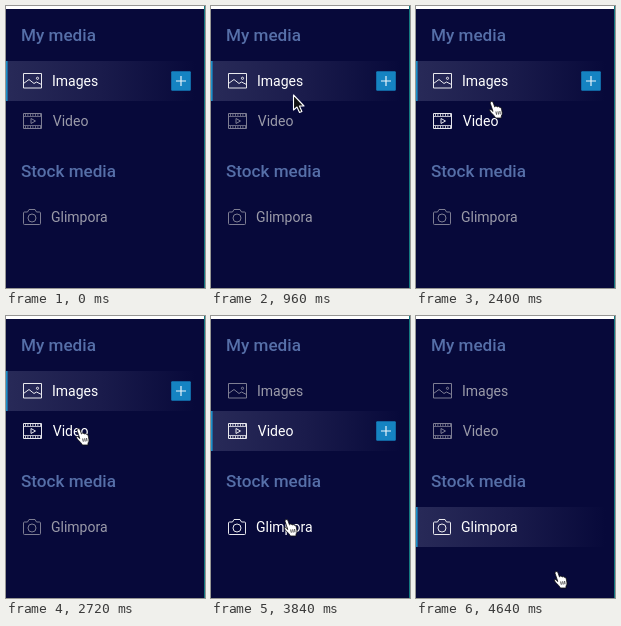
Recreate the animation shown at these times as an HTML page. Size 199 px wide and 282 px high, loop 4.8 s.

```html
<!DOCTYPE html>
<html lang="en">
<head>
<meta charset="utf-8">
<title>Media menu</title>
<style>
  html, body { margin: 0; width: 100%; height: 100%; overflow: hidden; background: #07093a; }
  svg { display: block; width: 199px; height: 282px; }
  text { font-family: Roboto, Arial, sans-serif; font-size: 14px; }
  .head { font-size: 17.1px; font-weight: 500; fill: #566fa8; }
  .item { color: #9b9ba9; }
  .item.lit { color: #fff; }
  .item text { fill: currentColor; }
  .icon { fill: none; stroke: currentColor; stroke-width: 1; stroke-linejoin: round; opacity: .9; }
  .item:not(.lit) .icon { opacity: .8; }
</style>
</head>
<body>
<svg viewBox="0 0 199 282">
  <defs>
    <linearGradient id="glow">
      <stop offset="0" stop-color="#282a58"/>
      <stop offset=".5" stop-color="#1a1b4b"/>
      <stop offset="1" stop-color="#07093a"/>
    </linearGradient>
    <g id="bar">
      <rect width="190" height="40" fill="url(#glow)"/>
      <rect width="1.6" height="40" fill="#1c8fca"/>
    </g>
    <g id="plus">
      <rect x="165.2" y="10.2" width="19.6" height="19.6" rx="1" fill="#1583c2"/>
      <path d="M170 20h10M175 15v10" stroke="#e8f4fb" stroke-width="1.2"/>
    </g>
  </defs>

  <rect width="199" height="282" fill="#07093a"/>

  <g class="row"><use href="#bar" y="55"/><use href="#plus" y="55"/></g>
  <g class="row"><use href="#bar" y="95"/><use href="#plus" y="95"/></g>
  <g class="row"><use href="#bar" y="191"/></g>

  <text class="head" x="15" y="35">My media</text>
  <text class="head" x="15" y="171">Stock media</text>

  <g class="item">
    <g class="icon">
      <rect x="17.5" y="67.5" width="18" height="14.5"/>
      <path d="M17.5 77.5l5.500-4 5 4 2.500-1.500 5 2.500"/>
      <circle cx="31.500" cy="72.300" r="1.100"/>
    </g>
    <text x="46" y="80">Images</text>
  </g>
  <g class="item">
    <g class="icon">
      <rect x="17.5" y="107.5" width="18" height="15"/>
      <path d="M18 110.500h17M18 119.500h17" stroke-width=".8"/>
      <path d="M19 109h16M19 121h16" stroke-width="1.800" stroke-dasharray=".8 1.700"/>
      <path d="M25 112.500l4.500 2.500-4.500 2.500z"/>
    </g>
    <text x="46.8" y="120">Video</text>
  </g>
  <g class="item">
    <g class="icon">
      <path d="M18.500 206h3l1.500-2.500h6l1.500 2.500h3q1 0 1 1v10.500q0 1-1 1h-15q-1 0-1-1V207q0-1 1-1z"/>
      <circle cx="26" cy="212" r="4"/>
    </g>
    <text x="45" y="216">Glimpora</text>
  </g>

  <g id="arrow" fill="#111" stroke="#fff" stroke-width="1.1" stroke-linejoin="round">
    <path d="M.5.5v15l3.500-3 2.500 5.500 2.400-1-2.500-5.500h4.600z"/>
  </g>
  <g id="hand" fill="#fff" stroke="#111" stroke-width=".8" stroke-linejoin="round">
    <path d="M3.800 10.500L1 2.300Q.7.700 2.100.5T4 1.800L5.500 6Q6.300 4.600 7.600 5.300L8 6Q9.400 5 10.300 6.300 12 6 12.300 8L13 12Q13 14 12 15v2H6.500Q5 14.500 2 11.800-.3 9.600.5 8.600 1.600 7.800 3.800 10.500z"/>
    <path d="M6.700 10.500l.6 3.200M8.700 10.300l.5 3.200M10.600 10l.4 3.300" stroke-width=".8"/>
  </g>

  <rect width="199" height="3" fill="#fff"/>
  <rect x="198" width="1" height="282" fill="#147a80"/>
</svg>
<script>
  const LOOP = 4800, TICK = 160;

  // Pointer stops: time, x, y; it travels straight between stops.
  const path = [
    [160, 176, 189], [640, 82, 143], [960, 82, 88.5], [1120, 83, 76],
    [1280, 72, 63], [1440, 74, 71], [1600, 76.5, 78], [2080, 76.5, 78],
    [2720, 70, 112], [2880, 70, 113], [3200, 72.5, 143],
    [3840, 73, 203], [4000, 71, 203], [4480, 71, 203], [4640, 138, 255]
  ];
  const rows = [...document.querySelectorAll('.row')];
  const items = [...document.querySelectorAll('.item')];
  const arrow = document.getElementById('arrow');
  const hand = document.getElementById('hand');

  function pointAt(t) {
    const i = path.findIndex(p => p[0] >= t);
    if (i <= 0) return path[0].slice(1);
    const [a, b] = [path[i - 1], path[i]];
    const k = (t - a[0]) / (b[0] - a[0]);
    return [a[1] + (b[1] - a[1]) * k, a[2] + (b[2] - a[2]) * k];
  }

  function draw(t) {
    const [x, y] = pointAt(t);
    const place = `translate(${x} ${y})`;
    arrow.setAttribute('transform', place);
    hand.setAttribute('transform', place);
    arrow.style.display = t >= 160 && t < 1120 ? '' : 'none';
    hand.style.display = t >= 1120 ? '' : 'none';

    const active = t < 2880 ? 0 : t < 4000 ? 1 : 2;
    const lit = [active === 0, t >= 2400 && active < 2, t >= 3680];
    rows.forEach((row, i) => { row.style.display = i === active ? '' : 'none'; });
    items.forEach((item, i) => item.classList.toggle('lit', lit[i]));
  }

  const start = performance.now();
  function frame() {
    const t = (performance.now() - start) % LOOP;
    draw(Math.floor(t / TICK) * TICK);
    requestAnimationFrame(frame);
  }
  frame();
</script>
</body>
</html>
```
